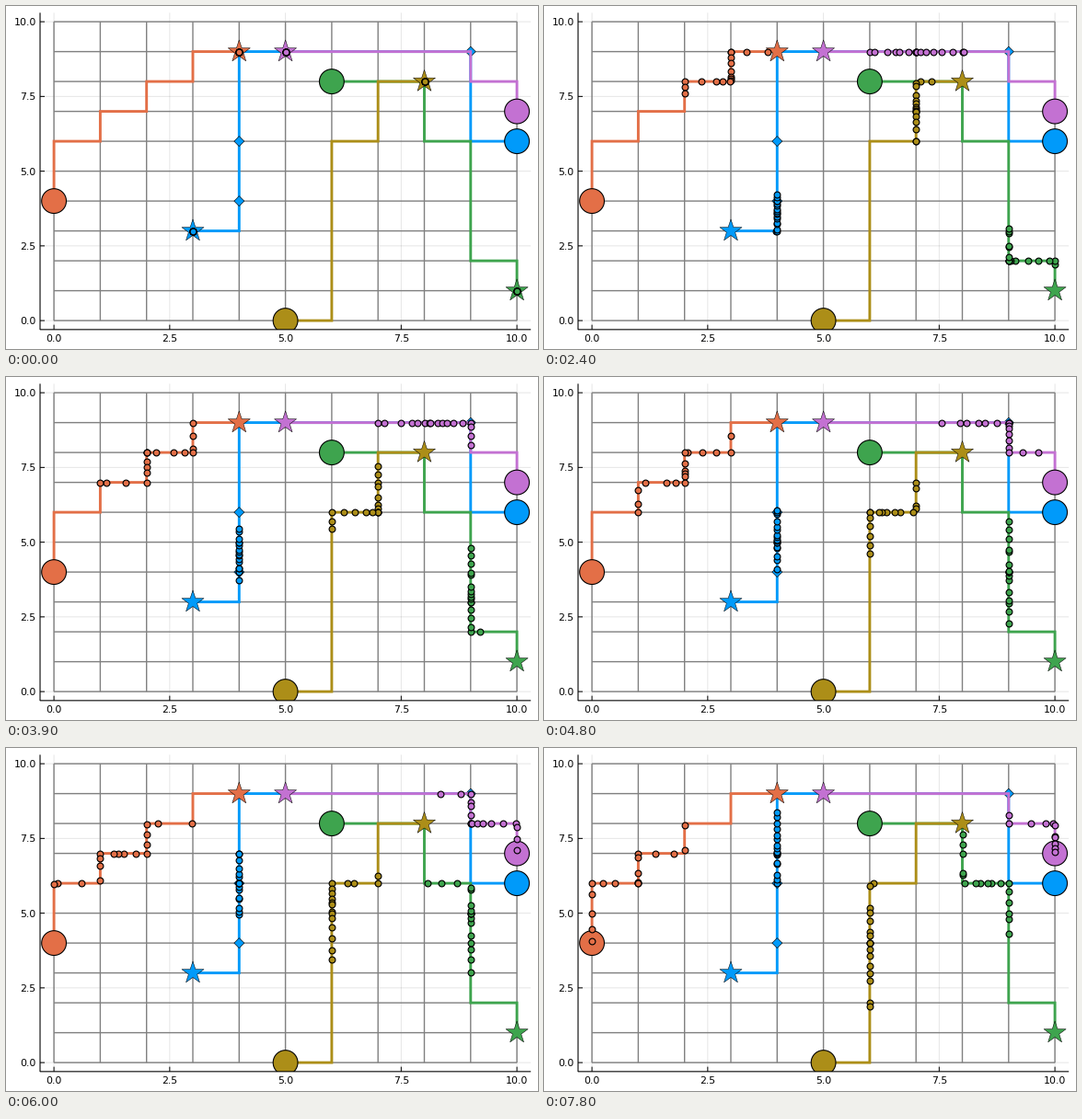
Write a matplotlib script that moves like this. It is 578 px wide and 373 px high and loops after 8000 ms.

```python
import numpy as np
import matplotlib.pyplot as plt
from matplotlib.animation import FuncAnimation
from matplotlib.patches import Rectangle

WIDTH, HEIGHT, DPI = 578, 373, 100
PX = 72 / DPI  # points per pixel
INTERVAL, FRAMES, HOLD = 100, 80, 3
DOTS = 17
REST = 0.1  # part of a cell lost to waiting on either side of a crossing
LOW, HIGH = -0.3, 10.3

# colour, route corners, pace in cells per second, spread of the swarm
AGENTS = [
    ("#009afa", [(3, 3), (4, 3), (4, 9), (9, 9), (9, 6), (10, 6)], .66, .45),
    ("#e36f47", [(4, 9), (3, 9), (3, 8), (2, 8), (2, 7), (1, 7), (1, 6),
                 (0, 6), (0, 4)], .77, 1.02),
    ("#3ea44e", [(10, 1), (10, 2), (9, 2), (9, 6), (8, 6), (8, 8), (6, 8)],
     .83, .76),
    ("#c371d2", [(5, 9), (9, 9), (9, 8), (10, 8), (10, 7)], .85, .7),
    ("#ac8e18", [(8, 8), (7, 8), (7, 6), (6, 6), (6, 0), (5, 0)], .77, .78),
]
WAYPOINTS = [(4, 4), (4, 6), (9, 9)]


def to_px(points):
    x, y = np.asarray(points, float).reshape(-1, 2).T
    return 52.1 + 50.3 * x, 342.1 - 32.5 * y


def line(points, color, width, z, **kw):
    ax.plot(*to_px(points), color=color, lw=width * PX, zorder=z, snap=False,
            solid_capstyle="butt", solid_joinstyle="miter", **kw)


def polygon(center, radii, color, edge, z):
    """Closed shape with its vertices spread evenly, the first one on top."""
    cx, cy = to_px(center)
    turn = 2 * np.pi * np.arange(len(radii)) / len(radii)
    shape, = ax.fill(cx + radii * np.sin(turn), cy - radii * np.cos(turn),
                     fc=color, ec="black", lw=edge * PX, zorder=z,
                     joinstyle="round", snap=False)
    shape.set_clip_path(plot_area)


def draw_axes():
    for tick in np.arange(0, 10.1, 2.5):
        line([(tick, LOW), (tick, HIGH)], "black", 1, 0, alpha=.1)
        line([(LOW, tick), (HIGH, tick)], "black", 1, 0, alpha=.1)
        line([(tick, LOW), (tick, LOW + .16)], "black", 1, 1)
        line([(LOW, tick), (LOW + .1, tick)], "black", 1, 1)
        (x,), (y,) = to_px((tick, tick))
        style = dict(family="DejaVu Sans", size=11 * PX)
        ax.text(x, 362, f"{tick:.1f}", ha="center", va="center", **style)
        ax.text(32.7, y + 1, f"{tick:.1f}", ha="right", va="center", **style)
    line([(LOW, HIGH), (LOW, LOW), (HIGH, LOW)], "black", 1.1, 15)
    for k in range(11):
        line([(0, k), (10, k)], "#808080", 1.4, 2)
        line([(k, 0), (k, 10)], "#808080", 1.4, 2)


def draw_agent(index, color, route):
    z = 3 + index
    line(route, color, 2.9, z)
    if index == 0:
        for point in WAYPOINTS:
            polygon(point, np.full(4, 5.5), color, .6, z + .1)
    polygon(route[0], np.tile([12.6, 4.9], 5), color, .5, z + .2)
    polygon(route[-1], np.full(90, 13.4), color, 1.1, z + .3)


def settle(dist):
    """Let dots rest briefly on each grid crossing."""
    node = np.round(dist)
    off = dist - node
    return node + np.sign(off) * np.maximum(0, abs(off) - REST) / (1 - 2 * REST)


class Swarm:
    """Dots that drift along a route and scatter like random walkers."""

    def __init__(self, index, color, route, pace, spread):
        self.route = np.array(route, float)
        steps = np.abs(np.diff(self.route, axis=0)).sum(axis=1)
        self.lengths = np.r_[0, np.cumsum(steps)]
        self.pace = pace
        rank = np.linspace(-1, 1, DOTS)
        rank[1:-1] += np.random.default_rng(index + 4).uniform(-.06, .06, DOTS - 2)
        self.scatter = spread * np.sign(rank) * abs(rank) ** 1.5
        self.dots, = ax.plot([], [], "o", ms=6.8 * PX, mfc=color, mec="black",
                             mew=1.15 * PX, zorder=20 + index, snap=False)

    def move(self, seconds):
        dist = self.pace * seconds + self.scatter * np.sqrt(seconds)
        dist = settle(np.maximum(0, dist))
        dist = dist[dist < self.lengths[-1]]
        spots = [np.interp(dist, self.lengths, axis) for axis in self.route.T]
        self.dots.set_data(*to_px(np.column_stack(spots)))
        return self.dots


fig = plt.figure(figsize=(WIDTH / DPI, HEIGHT / DPI), dpi=DPI, facecolor="white")
ax = fig.add_axes([0, 0, 1, 1])
ax.set(xlim=(0, WIDTH), ylim=(HEIGHT, 0))
ax.axis("off")

(left, right), (bottom, top) = to_px([(LOW, LOW), (HIGH, HIGH)])
plot_area = Rectangle((left, top), right - left, bottom - top,
                      transform=ax.transData)

draw_axes()
swarms = []
for i, (color, route, pace, spread) in enumerate(AGENTS):
    draw_agent(i, color, route)
    swarms.append(Swarm(i, color, route, pace, spread))


def update(frame):
    seconds = frame // HOLD * HOLD * INTERVAL / 1000
    return [swarm.move(seconds) for swarm in swarms]


anim = FuncAnimation(fig, update, frames=FRAMES, interval=INTERVAL,
                     repeat=True, repeat_delay=0)
plt.show()
```
